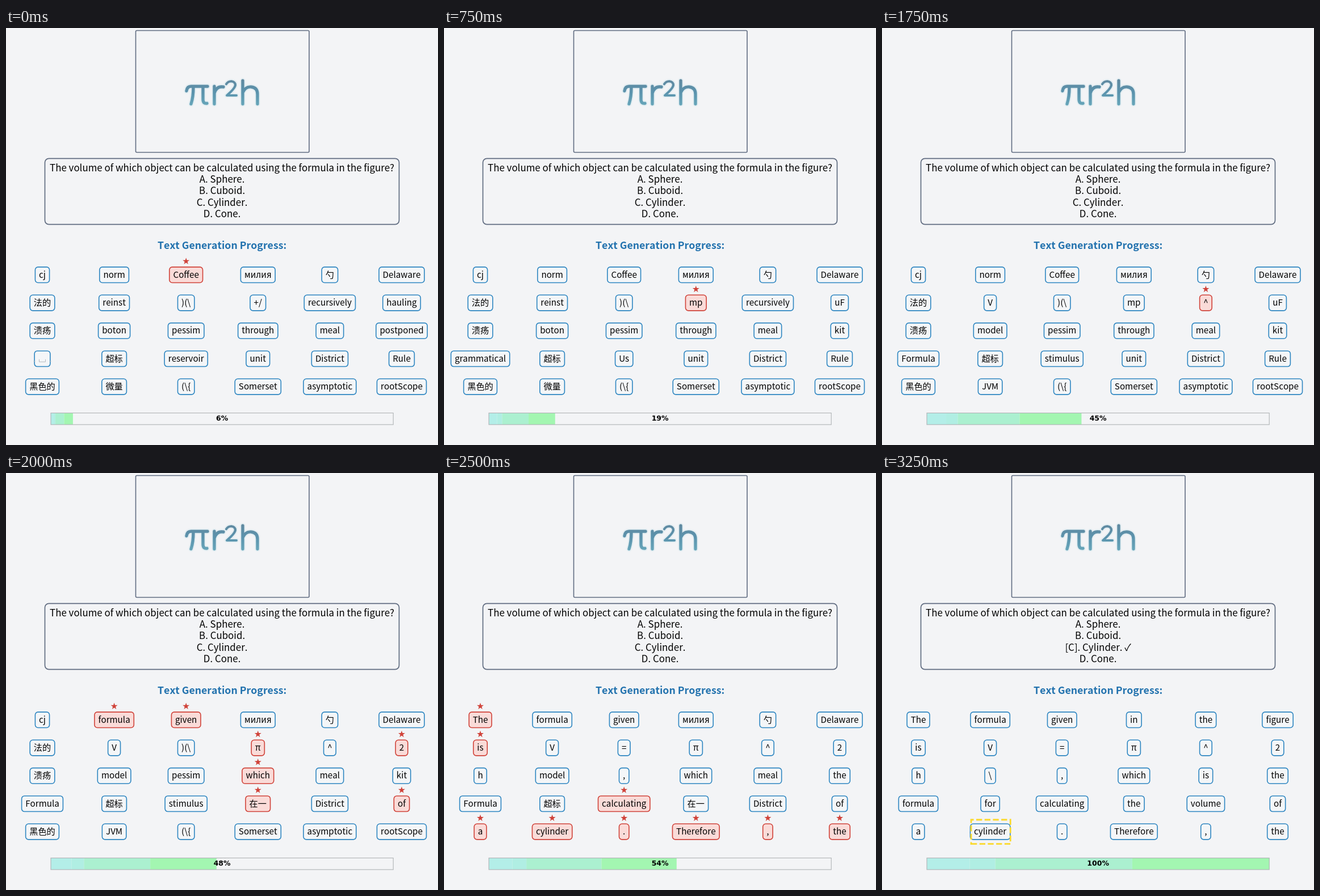
Animation of 761x736 px, one loop 8.5 s. Source, as an HTML page with a canvas:

```html
<!DOCTYPE html>
<html lang="zh-Hans">
<head>
<meta charset="utf-8">
<title>Text Generation Progress</title>
<style>
html, body { margin: 0; width: 100%; height: 100%; overflow: hidden; background: #f3f4f6; }
canvas { display: block; width: 761px; height: 736px; }
</style>
</head>
<body>
<canvas id="stage"></canvas>
<script>
const W = 761, H = 736, LOOP = 8500, STEP = 250;
const CJK = '"Noto Sans CJK SC", "Noto Sans CJK JP", "Noto Sans CJK", "Noto Sans", sans-serif';
const BG = '#f3f4f6', SLATE = '#5f6b80', BLUE = '#2e86c1', RED = '#d0433a';

const canvas = document.getElementById('stage');
const dpr = window.devicePixelRatio || 1;
canvas.width = W * dpr;
canvas.height = H * dpr;
const ctx = canvas.getContext('2d');

const start = [
  'cj', 'norm', 'Coffee', 'милия', '勺', 'Delaware',
  '法的', 'reinst', ')(\\', '+/', 'recursively', 'hauling',
  '溃疡', 'boton', 'pessim', 'through', 'meal', 'postponed',
  '␣', '超标', 'reservoir', 'unit', 'District', 'Rule',
  '黑色的', '微量', '(\\{', 'Somerset', 'asymptotic', 'rootScope'
];

// Each step: finished parts out of 31, then the cells rewritten in it.
const steps = [
  [2, { 2: 'Coffee' }],
  [3, { 11: 'uF' }],
  [4, { 17: 'kit', 18: 'grammatical', 20: 'Us' }],
  [6, { 9: 'mp' }],
  [7, { 13: 'model' }],
  [8, { 25: 'JVM' }],
  [10, { 7: 'V', 18: 'Formula', 20: 'stimulus' }],
  [14, { 10: '^' }],
  [15, { 1: 'formula', 2: 'given', 9: 'π', 11: '2', 15: 'which', 21: '在一', 23: 'of' }],
  [16, { 0: 'the', 8: '=', 12: 'h', 14: ',', 17: 'the', 20: 'Calculate', 25: 'circle', 29: 'The' }],
  [17, { 0: 'The', 6: 'is', 20: 'calculating', 24: 'a', 25: 'cylinder', 26: '.', 27: 'Therefore', 28: ',', 29: 'the' }],
  [18, { 3: 'in', 4: 'the', 16: 'is', 18: 'formula', 19: 'for', 22: 'volume' }],
  [19, { 5: 'figure', 13: '\\', 21: 'the' }],
  [31, {}]
];
const LAST = steps.length - 1;

function box(x, y, w, h, r, stroke, lw, fill) {
  ctx.beginPath();
  ctx.roundRect(x, y, w, h, r);
  if (fill) {
    ctx.fillStyle = fill;
    ctx.fill();
  }
  ctx.strokeStyle = stroke;
  ctx.lineWidth = lw;
  ctx.stroke();
}

function label(str, x, y, font, color) {
  ctx.font = font;
  ctx.fontKerning = 'none';
  ctx.textAlign = 'center';
  ctx.fillStyle = color;
  ctx.fillText(str, x, y);
}

function star(x, y, r) {
  ctx.beginPath();
  for (let i = 0; i < 10; i++) {
    const a = i * Math.PI / 5, d = i % 2 ? r * 0.4 : r;
    ctx.lineTo(x + d * Math.sin(a), y - d * Math.cos(a));
  }
  ctx.closePath();
  ctx.fillStyle = RED;
  ctx.fill();
}

function drawFormula() {
  const ink = ctx.createLinearGradient(0, 91, 0, 136);
  ink.addColorStop(0, '#6089a0');
  ink.addColorStop(0.5, '#5b93ad');
  ink.addColorStop(1, '#66a5b9');
  const thick = new Path2D(
    'M318 111Q319 103 326 103H355M330 104Q330 122 326 134M347 104V126Q347 134 354 133' +
    'M367 103V134M367 115Q371 102 383 104' +
    'M417 93V134M417 114Q422 103 432 104Q443 105 443 117V134');
  const thin = new Path2D('M388 99Q391 94 397 94Q404 95 404 101Q403 107 389 119H406');
  ctx.save();
  ctx.lineCap = 'round';
  ctx.lineJoin = 'round';
  ctx.filter = 'blur(0.7px)';
  for (const [color, extra] of [['#e3edf1', 4], [ink, 0]]) {
    ctx.strokeStyle = color;
    ctx.lineWidth = 5.4 + extra;
    ctx.stroke(thick);
    ctx.lineWidth = 4.2 + extra;
    ctx.stroke(thin);
  }
  ctx.restore();
}

function drawQuestion(done) {
  box(228.5, 4.5, 305.5, 215, 2, SLATE, 1.6);
  drawFormula();
  box(68.5, 230.3, 624, 116.3, 7, SLATE, 1.7);
  const lines = [
    'The volume of which object can be calculated using the formula in the figure?',
    'A. Sphere.',
    'B. Cuboid.',
    done ? '[C]. Cylinder. ✓' : 'C. Cylinder.',
    'D. Cone.'
  ];
  lines.forEach((s, i) => label(s, 380.6, 252.8 + 20.3 * i, '16.9px ' + CJK, '#000'));
  label('Text Generation Progress:', 380.6, 390, 'bold 17.7px ' + CJK, '#2272ae');
}

function drawBlank(x, y) {
  ctx.strokeStyle = '#b4b9bf';
  ctx.lineWidth = 1;
  ctx.stroke(new Path2D(
    `M${x - 5.5} ${y + 1}v4.5h11v-4.5M${x - 15.5} ${y + 4.5}h3M${x + 12.5} ${y + 4.5}h3`));
}

function drawToken(str, i, hot) {
  const x = 64 + 126.6 * (i % 6), y = 435.7 + 49.35 * Math.floor(i / 6);
  const blank = str === '␣';
  const font = '15.2px ' + CJK;
  ctx.font = font;
  ctx.fontKerning = 'none';
  const w = (blank ? 14.5 : ctx.measureText(str).width) + 13.2;
  box(x - w / 2, y - 13.8, w, 27.6, 5, hot ? RED : BLUE, 1.6, hot ? '#fadbd8' : '#f4f6f8');
  if (blank) drawBlank(x, y);
  else label(str, x, y + 5, font, '#000');
  if (hot) star(x, y - 24, 6.3);
}

function drawBar(part) {
  const x = 79, y = 679.5, full = 603.2, w = full * part / 31;
  const bands = [[0, '#b3eee8'], [0.125, '#b0eee3'], [0.2, '#abf0d0'], [0.6, '#a3f6b1']];
  bands.forEach(([from, color], i) => {
    const to = i < 3 ? bands[i + 1][0] : 1;
    ctx.fillStyle = color;
    ctx.fillRect(x + w * from, y, w * (to - from), 20.5);
  });
  ctx.strokeStyle = '#b0b2b5';
  ctx.lineWidth = 1.1;
  ctx.strokeRect(x, y, full, 20.5);
  label(Math.floor(part / 31 * 100) + '%', 380.6, 693.4,
    'bold 12.5px "DejaVu Sans", sans-serif', '#000');
}

function drawMarker() {
  ctx.save();
  ctx.strokeStyle = '#fbd92b';
  ctx.lineWidth = 2.8;
  ctx.setLineDash([10.3, 4.4]);
  ctx.stroke(new Path2D('M157 654.6H226.2V612H157Z'));
  ctx.restore();
}

function draw(n) {
  const words = Object.assign([...start], ...steps.slice(0, n + 1).map(s => s[1]));
  ctx.setTransform(dpr, 0, 0, dpr, 0, 0);
  ctx.fillStyle = BG;
  ctx.fillRect(0, 0, W, H);
  drawQuestion(n === LAST);
  words.forEach((s, i) => drawToken(s, i, i in steps[n][1]));
  drawBar(steps[n][0]);
  if (n === LAST) drawMarker();
}

function tick() {
  const t = performance.now() % LOOP;
  draw(Math.min(LAST, Math.floor(t / STEP)));
  requestAnimationFrame(tick);
}
tick();
</script>
</body>
</html>
```
